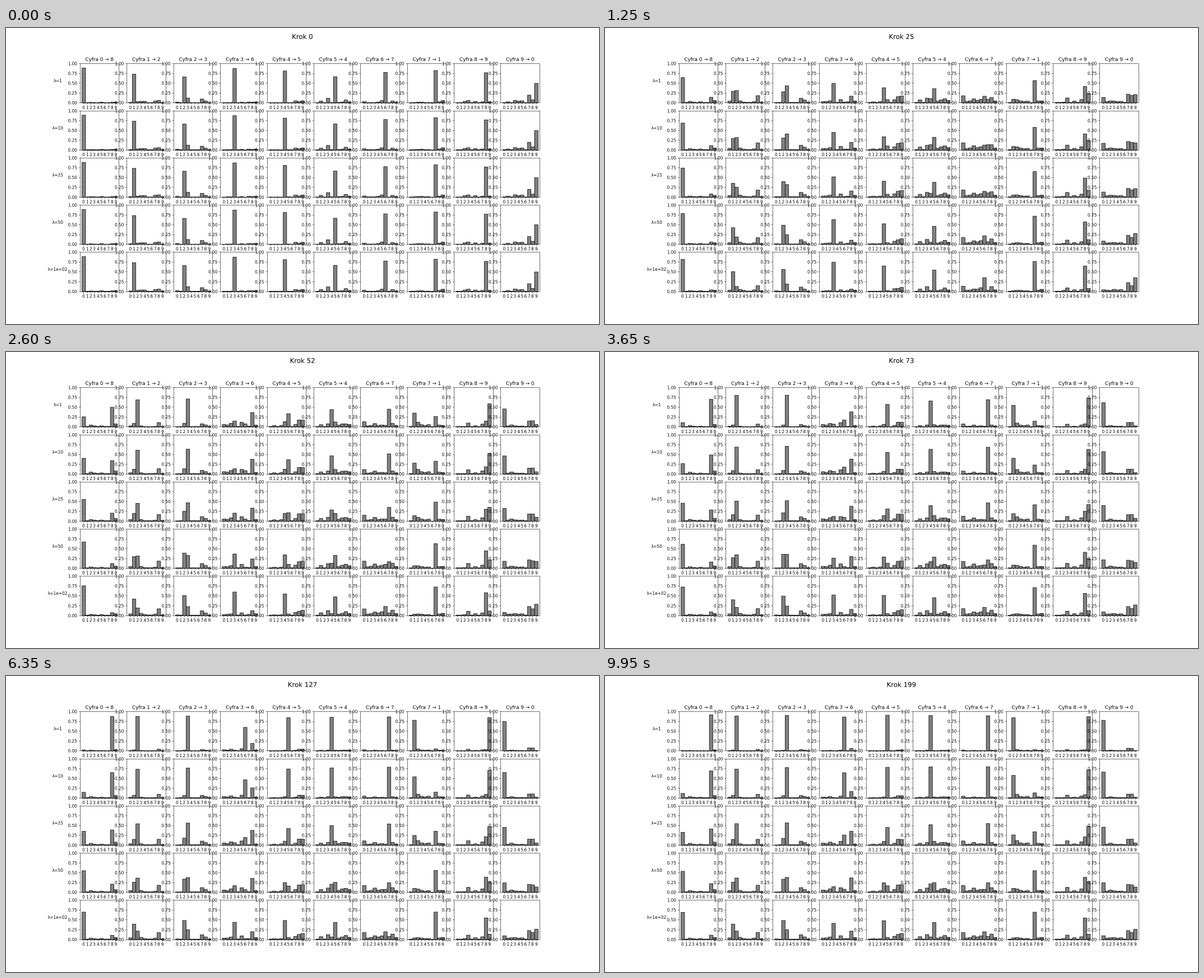
Recreate the animation shown at these times as a matplotlib script. Size 1058 by 529 pixels, loop 10000 ms.

```python
import numpy as np
import matplotlib.pyplot as plt
from matplotlib.animation import FuncAnimation
from matplotlib.collections import PolyCollection
from matplotlib.patches import PathPatch
from matplotlib.textpath import TextPath
from matplotlib.transforms import Affine2D, IdentityTransform

WIDTH, HEIGHT, DPI = 1058, 529, 52.9
STEPS = 200
LAMBDAS = np.array([1, 10, 25, 50, 100])

titles = []
digit_heights = []


def progress(pace, stiffness, power):
    """Share of the path covered, per lambda and step: strong pull stops early."""
    reach = 1 / (1 + (LAMBDAS / stiffness) ** power)
    tau = pace * LAMBDAS ** -.12
    settle = (1 - np.exp(-np.arange(STEPS) / tau[:, None])) ** 1.25
    return (reach / reach[0])[:, None] * settle / settle[:, -1:]


def add_digit(source, target, start, middle, end, rivals, **motion):
    """Carry the bars through three poses along a parabola in log space.

    Poses give the percentages of (source, target); rivals maps the other
    noticeable classes to their percentages in the first two poses.
    """
    poses = np.array([[.7], [1.5], [1.5]]) * np.ones(10)
    for digit, (first, second) in rivals.items():
        poses[:, digit] = first, second, second
    others = np.delete(np.arange(10), [source, target])
    poses[2, others] *= (100 - sum(end)) / poses[2, others].sum()
    poses[:, [source, target]] = start, middle, end

    logs = np.log(poses / poses[:, [source]])
    score = logs[:, target]
    a, b, c = np.polyfit((score - score[0]) / (score[2] - score[0]), logs, 2)
    u = progress(**motion)[..., None]
    weights = np.exp(a * u ** 2 + b * u + c)
    titles.append(f"Cyfra {source} → {target}")
    digit_heights.append(weights / weights.sum(axis=-1, keepdims=True))


add_digit(0, 8, (89, 1.8), (29, 47), (1.3, 92),
          {2: (1.5, 5), 3: (1, 3), 5: (2, 3), 9: (2, 8)},
          pace=55, stiffness=20, power=.75)
add_digit(1, 2, (71, 3), (26, 35), (2.5, 89),
          {0: (1.5, 4.5), 3: (4, 5), 4: (4, 2), 7: (5, 3), 8: (6, 18)},
          pace=31, stiffness=50, power=.8)
add_digit(2, 3, (66, 12.5), (26.5, 47), (1.7, 90.5),
          {0: (2.5, 1), 7: (10, 12), 8: (5, 7.5)},
          pace=42, stiffness=24, power=1.1)
add_digit(3, 6, (88, .3), (17, 7), (.6, 86.5),
          {0: (.5, 6), 1: (1, 5), 2: (1, 9), 5: (2, 12), 7: (2.5, 2),
           8: (2, 35.5), 9: (2.5, 4.5)},
          pace=72, stiffness=46, power=1.25)
add_digit(4, 5, (81, 1), (28, 14), (1.2, 91),
          {1: (.5, 3.5), 3: (.5, 4), 7: (5.5, 8), 8: (3.5, 18.5),
           9: (5.5, 19.5)},
          pace=48, stiffness=44, power=1.3)
add_digit(5, 4, (67, 1), (20, 28), (1.1, 90),
          {1: (5, 7), 3: (12, 10), 6: (1.5, 5), 7: (2.5, 8.5),
           8: (7.5, 9.5), 9: (2.5, 7)},
          pace=45, stiffness=45, power=1.25)
add_digit(6, 7, (77.5, .5), (11, 15.5), (.6, 89.5),
          {0: (3.5, 18), 1: (1, 4), 2: (1, 5.5), 3: (1, 11), 4: (2.5, 6),
           5: (6, 8), 8: (5, 13), 9: (1.5, 5)},
          pace=34, stiffness=73, power=1.2)
add_digit(7, 1, (82.5, 1.2), (32, 28.5), (3.5, 84.5),
          {2: (1.8, 12), 3: (2.3, 6), 4: (1.2, 4), 5: (1.2, 6),
           6: (.1, .3), 8: (3, 5), 9: (6, 4)},
          pace=48, stiffness=27, power=1.1)
add_digit(8, 9, (76, 3), (36, 30), (3, 87.2),
          {2: (4, 2), 3: (6, 13), 5: (4, 4.5), 7: (3, 9)},
          pace=38, stiffness=37, power=1)
add_digit(9, 0, (50, 1), (13.5, 24.5), (1, 78),
          {1: (3, 3.5), 2: (1, 6), 3: (6.5, 4), 4: (4.5, 3), 5: (5.5, 3.5),
           7: (20, 20), 8: (8, 19)},
          pace=36, stiffness=57, power=1.1)

# Axes order: lambda, digit, step, class
heights = np.stack(digit_heights, axis=1)

fig, axes = plt.subplots(len(LAMBDAS), len(titles),
                         figsize=(WIDTH / DPI, HEIGHT / DPI), dpi=DPI)
for (row, col), ax in np.ndenumerate(axes):
    ax.set(xlim=(-1, 10), ylim=(0, 1), xticks=range(10),
           yticks=np.linspace(0, 1, 5))
    if row == 0:
        ax.set_title(titles[col])
    if col == 0:
        ax.set_ylabel(f"λ={LAMBDAS[row]:.2g}", rotation=0, labelpad=25)

boxes = np.array([[ax.get_position().bounds for ax in line] for line in axes])
boxes *= [WIDTH, HEIGHT, WIDTH, HEIGHT]
left, bottom, width, height = np.moveaxis(boxes, -1, 0)[..., None]

# Render the fixed axes once at double size and keep their smoothed black ink.
fig.set_dpi(2 * DPI)
fig.canvas.draw()
shade = np.array(fig.canvas.buffer_rgba())[..., 0]
fig.set_dpi(DPI)
fig.clear()
ink = np.zeros((HEIGHT, WIDTH, 4), np.uint8)
ink[..., 3] = 255 - shade.reshape(HEIGHT, 2, WIDTH, 2).mean(axis=(1, 3))
fig.figimage(ink).set_zorder(2)

# A quarter pixel lines the bars up with the double-size pixel centres.
edges = left + width * (np.arange(11) + .5) / 11 + .25
x0, x1 = edges[..., :-1], edges[..., 1:]
y0 = bottom + 0 * x0 - .25


def bar_outlines(step):
    y1 = y0 + height * heights[:, :, step]
    corners = [(x0, y0), (x1, y0), (x1, y1), (x0, y1)]
    points = [np.stack(corner, axis=-1) for corner in corners]
    return np.stack(points, axis=-2).reshape(-1, 4, 2)


def heading_path(step):
    size = 16 * DPI / 72
    path = TextPath((0, .98 * HEIGHT - .76 * size), f"Krok {step}", size=size)
    box = path.get_extents()
    shift = WIDTH / 2 - (box.x0 + box.x1) / 2
    return path.transformed(Affine2D().translate(shift, 0))


bars = PolyCollection(bar_outlines(0), facecolors="gray", edgecolors="black",
                      linewidths=1, joinstyle="miter", snap=False, zorder=1,
                      transform=IdentityTransform())
heading = PathPatch(heading_path(0), facecolor="black", linewidth=0,
                    snap=False, transform=IdentityTransform())
fig.add_artist(bars)
fig.add_artist(heading)


def update(step):
    bars.set_verts(bar_outlines(step))
    heading.set_path(heading_path(step))
    return bars, heading


animation = FuncAnimation(fig, update, frames=STEPS, interval=50, repeat=True)
plt.show()
```
